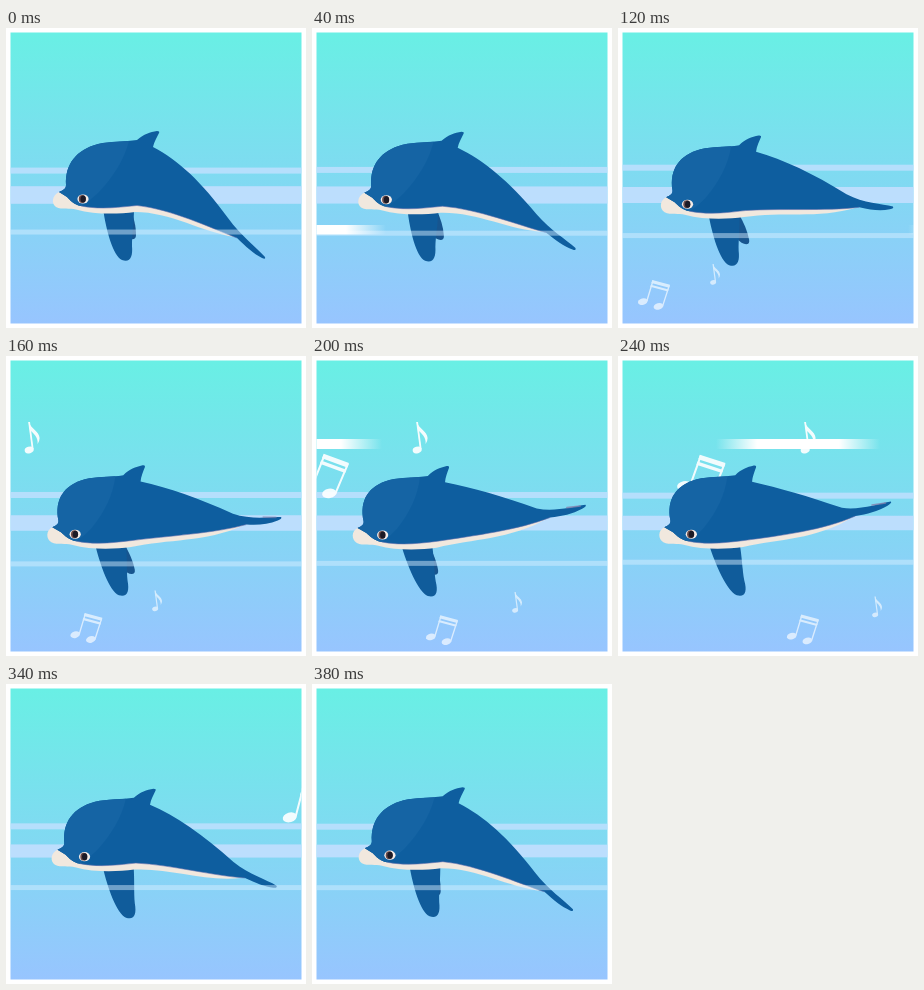
Recreate the animation shown at these times as an HTML page. Size 300x300 px, loop 0.4 s.

```html
<!DOCTYPE html>
<html lang="en">
<head>
<meta charset="utf-8">
<title>Swimming dolphin</title>
<style>
  html, body { margin: 0; width: 100%; height: 100%; overflow: hidden; background: #fff; }
  svg { display: block; width: 100%; height: 100%; }
</style>
</head>
<body>
<svg viewBox="0 0 300 300">
  <defs>
    <linearGradient id="water" x1="0" y1="0" x2="0" y2="1">
      <stop offset="0" stop-color="#68f0e4"/>
      <stop offset="1" stop-color="#98c4ff"/>
    </linearGradient>
    <linearGradient id="flash">
      <stop offset="0" stop-color="#fff" stop-opacity="0"/>
      <stop offset=".25" stop-color="#fff"/>
      <stop offset=".75" stop-color="#fff"/>
      <stop offset="1" stop-color="#fff" stop-opacity="0"/>
    </linearGradient>
    <clipPath id="panel"><rect x="4.5" y="4.5" width="291" height="291"/></clipPath>
    <g id="single">
      <ellipse cx="-2.8" cy="12" rx="4.6" ry="3.3" transform="rotate(-18 -2.8 12)"/>
      <path d="M1.6 11 L-2 -16 L-3.8 -16 L-.2 11Z"/>
      <path d="M-3.2 -16 C-1 -9 7 -7 7.6 0 Q7.6 3 5.6 6 C6.4 -1 1 -5 -2 -8Z"/>
    </g>
    <g id="beamed">
      <ellipse cx="-40" cy="25" rx="7.2" ry="4.8" transform="rotate(-15 -40 25)"/>
      <ellipse cx="-17" cy="32" rx="7.2" ry="4.8" transform="rotate(-15 -17 32)"/>
      <path d="M-25 -6 L-34 24 M-1 1 L-11 32" fill="none" stroke="#fff" stroke-width="2"/>
      <path d="M-26 -7 L0 0 L-1.4 4.6 L-27.4 -2.4Z M-28 0 L-2 7 L-3 10.2 L-29 3.2Z"/>
    </g>
  </defs>
  <g clip-path="url(#panel)">
    <rect width="300" height="300" fill="url(#water)"/>
    <rect id="bandTop" width="300" height="6" fill="#c4e0ff" opacity=".78"/>
    <rect id="bandMid" width="300" fill="#c4e0ff" opacity=".88"/>
    <g fill="#fff">
      <use id="noteA" href="#single" opacity=".62"/>
      <use id="noteB" href="#beamed"/>
      <use id="noteC" href="#single" opacity=".92"/>
      <use id="noteD" href="#beamed" opacity=".9"/>
    </g>
    <path id="farFin" fill="#17558f"/>
    <path id="nearFin" fill="#105c9b"/>
    <path id="belly" fill="#f1e8de"/>
    <path id="body" fill="#0e5e9f"/>
    <path id="brow" fill="#1564a4"/>
    <path id="seam" fill="none" stroke="#5f6cad" stroke-width=".8" opacity=".7"/>
    <path id="fluke" fill="none" stroke="#8583b0" stroke-width="1.6" stroke-linecap="round"/>
    <g id="eye">
      <ellipse rx="5.6" ry="4.6" fill="#f5ece8"/>
      <ellipse cx="-.8" rx="3.4" ry="3.9" fill="#6b4a48"/>
      <ellipse cx=".2" rx="2.7" ry="3.5" fill="#1c1a26"/>
    </g>
    <rect id="bandLow" width="300" height="5" fill="#d8efff" opacity=".47"/>
    <rect id="streakLow" y="197" width="160" height="9.5" fill="url(#flash)"/>
    <rect id="streakHigh" y="83" width="164" height="10" fill="url(#flash)"/>
  </g>
</svg>
<script>
const LOOP = 400, STEP = 20;
const el = {};
document.querySelectorAll('svg [id]').forEach(e => el[e.id] = e);
const set = (id, name, value) => el[id].setAttribute(name, value);
const clamp = v => Math.max(0, Math.min(1, v));
const wave = angle => (1 - Math.cos(angle)) / 2;

// The dolphin at rest, diving; every x,y pair is bent while it swims.
const FACE = 'C57,162 60,161 60,157 C59,136 70,122 92,116 ';
const UNDER = '231,210 C205,200 165,181 131,177.5 C115,179 95,182 75,178 ';
const SHAPES = {
  body: 'M53,164 ' + FACE + 'C105,113 119,114 131,112 C138,106 144,104 151,103 ' +
    'Q154,103 153,105 C151,109 148,114 147,119 C172,132 196,154 222,190 ' +
    'C235,208 250,219 259,229 Q260,232 256,230 C248,226 240,219 ' + UNDER +
    'C68,177 64,172 61,169 Z',
  brow: 'M53,164 ' + FACE + 'C105,113 115,114 123,113 ' +
    'C118,132 108,148 92,165 Q85,172 75,178 C68,177 64,172 61,169 Z',
  seam: 'M' + UNDER,
  belly: 'M53,164 C46,167 45,176 50,179 C56,182 64,180 70,181.5 ' +
    'C90,187 112,186 129,184 C165,184 195,204 229,209 L166,150 Z',
  fluke: 'M245,214 L255,225'
};
const FINS = {
  nearFin: 'M97,180 C100,202 107,228 116,232 C124,235 127,229 126,218 ' +
    'C126,206 128,195 128,180 Z',
  farFin: 'M113,180 L118,205 C122,212 131,214 131,207 C131,198 128,190 124,180 Z'
};

const warp = (d, fn) => d.replace(/([\d.]+),([\d.]+)/g, (m, x, y) =>
  fn(+x, +y).map(v => v.toFixed(2)).join());

function move(id, x, y, size = 1, turn = 0) {
  set(id, 'transform', `translate(${x} ${y}) rotate(${turn}) scale(${size})`);
}

function draw(t) {
  const turn = 2 * Math.PI * t / LOOP;
  const swing = Math.sin(turn);
  const head = wave(turn);
  const tail = wave(turn - .23 + .27 * Math.cos(turn - .79));

  // The head pitches and sinks; the tail lags and curls up along an arc.
  const bend = (x, y) => {
    const s = Math.max(0, x - 125 - .2 * (180 - y));
    const w = clamp((x - 130) / 110);
    const k = head + (tail - head) * w;
    const arc = 32 * tail * (1 - tail) * w * w;
    return [
      x + k * (.15 * (y - 180) - 5 + .00055 * s * s) + arc,
      y + k * (8 - .012 * s ** 1.8)
    ];
  };
  const paddle = reach => (x, y) => {
    const [bx, by] = bend(Math.min(x, 130), y);
    const w = .3 + .7 * clamp((y - 185) / 45);
    return [bx - 3 * head + reach * swing * w, by];
  };

  for (const id in SHAPES) set(id, 'd', warp(SHAPES[id], bend));
  set('nearFin', 'd', warp(FINS.nearFin, paddle(-5)));
  set('farFin', 'd', warp(FINS.farFin, paddle(6)));
  set('fluke', 'opacity', .8 * clamp((tail - .6) / .3));
  const [ex, ey] = bend(77, 171);
  move('eye', ex - 3.5 * swing, ey);

  const half = 8.8 - .0065 * t;
  set('bandTop', 'y', 137.8 + 1.9 * Math.cos(turn + .31));
  set('bandMid', 'y', 167 - half);
  set('bandMid', 'height', 2 * half);
  set('bandLow', 'y', 203.2 + 2.2 * Math.cos(turn - 2.43));

  set('streakLow', 'x', 102 + 4.7 * (t - 80));
  set('streakHigh', 'x', 98 + 4.8 * (t - 240));

  const b = t - 120, d = t - 200;
  move('noteA', 43 + 1.35 * (t - 80), 245 + (t - 160) ** 2 / 1067, .66);
  move('noteB', 52 + 1.044 * b + .00164 * b * b, 264 - (t - 210) ** 2 / 1100, .68);
  set('noteB', 'opacity', .65 * clamp((t - 80) / 40));
  move('noteC', 108 + 2.05 * d, 82);
  move('noteD', 37 + 1.65 * d + .0028 * d * d, 107, 1, (300 - t) / 20);
}

const start = performance.now();
function tick() {
  const t = (performance.now() - start) % LOOP;
  draw(Math.floor(t / STEP) * STEP);
  requestAnimationFrame(tick);
}
draw(0);
requestAnimationFrame(tick);
</script>
</body>
</html>
```
